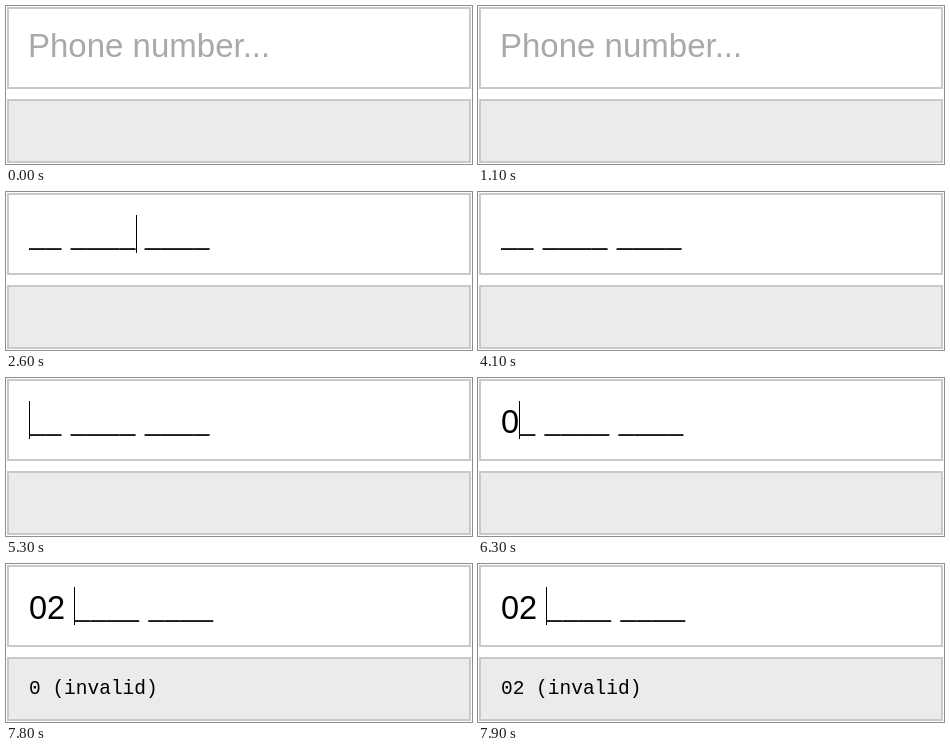
Animation of 466x158 px, one loop 8000 ms. Source, as an HTML page with a canvas:

```html
<!DOCTYPE html>
<html lang="en">
<head>
<meta charset="utf-8">
<title>Masked phone input</title>
<style>
  html, body { margin: 0; width: 466px; height: 158px; overflow: hidden; background: #fff; }
  canvas { display: block; width: 466px; height: 158px; }
</style>
</head>
<body>
<canvas id="stage"></canvas>
<script>
const W = 466, H = 158, LOOP = 8000;
const canvas = document.getElementById('stage');
const ratio = window.devicePixelRatio || 1;
canvas.width = W * ratio;
canvas.height = H * ratio;
const ctx = canvas.getContext('2d');
ctx.scale(ratio, ratio);

const SANS = '"Liberation Sans", sans-serif';
const MONO = '"Liberation Mono", monospace';
const SIZE = 32.5, LEFT = 23;

// Each entry overrides part of the state from its time on.
const timeline = [
  [0, { value: null, caret: -1, output: '' }],
  [2600, { value: '__ ____ ____', caret: 7 }],
  [2900, { caret: 0 }],
  [4100, { caret: -1 }],
  [5300, { caret: 0 }],
  [6300, { value: '0_ ____ ____', caret: 1 }],
  [6600, { output: '0 (invalid)' }],
  [7400, { caret: -1 }],
  [7800, { value: '02 ____ ____', caret: 3 }],
  [7900, { output: '02 (invalid)' }]
];

function stateAt(time) {
  return Object.assign({}, ...timeline.filter(([at]) => at <= time).map(([, change]) => change));
}

function rect(x, y, w, h, color) {
  ctx.fillStyle = color;
  ctx.fillRect(x, y, w, h);
}

function text(str, x, y, size, family, color) {
  ctx.font = `${size}px ${family}`;
  ctx.fillStyle = color;
  ctx.fillText(str, x, y);
}

function box(y, h, fill) {
  rect(1, y, 464, h, '#c9c9c9');
  rect(3, y + 2, 460, h - 4, fill);
}

function advance(ch) {
  return SIZE * (ch === '_' ? 0.5 : ch === ' ' ? 0.278 : 0.556);
}

function offset(value, index) {
  return [...value.slice(0, index)].reduce((x, ch) => x + advance(ch), LEFT);
}

function drawField({ value, caret }) {
  if (value === null) {
    text('Phone number...', 22, 51, 33, SANS, '#a9a9a9');
    return;
  }
  [...value].forEach((ch, i) => {
    const x = offset(value, i);
    if (ch === '_') rect(x, 56.2, advance(ch) + 0.05, 1.7, '#000');
    else text(ch, x, 54.5, SIZE, SANS, '#000');
  });
  if (caret >= 0) rect(Math.round(offset(value, caret)), 23, 1, 38, '#000');
}

function draw(time) {
  const state = stateAt(time);
  rect(0, 0, W, H, '#fff');
  box(1, 82, '#fff');
  box(93, 64, '#ebebeb');
  drawField(state);
  text(state.output, 23, 130, 19.5, MONO, '#000');
}

const start = performance.now();
function tick() {
  draw((performance.now() - start) % LOOP);
  requestAnimationFrame(tick);
}
tick();
</script>
</body>
</html>
```
